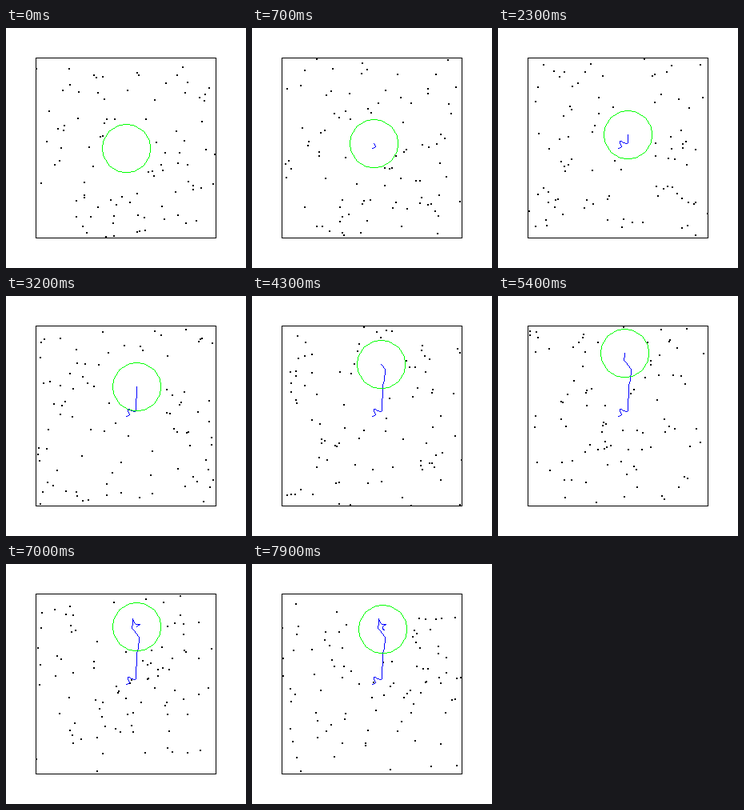
An HTML page with a canvas for the animation above (8000 ms loop, 300 px wide and 300 px high).

```html
<!DOCTYPE html>
<html lang="en">
<head>
<meta charset="utf-8">
<title>Brownian motion</title>
<style>
  html, body { margin: 0; width: 100%; height: 100%; overflow: hidden; background: #fff; }
  canvas { display: block; width: 300px; height: 300px; image-rendering: pixelated; }
</style>
</head>
<body>
<canvas id="stage" width="300" height="300"></canvas>
<script>
const ctx = document.getElementById('stage').getContext('2d');
const STEP_MS = 100, STEPS = 80, COUNT = 90;
const LOW = 38, HIGH = 262, RADIUS = 30, CONTACT = 32;

// The large disc passes one key point every four steps.
const KEY_STEPS = 4;
const route = [
  [150, 150], [154, 148], [152, 143], [153, 141], [157, 143], [162, 143], [162, 130],
  [163, 122], [163, 113], [165, 102], [166, 92], [160, 83], [157, 79], [158, 75],
  [158, 68], [161, 74], [167, 75], [164, 77], [163, 79], [165, 82], [162, 81]
];

// Catmull-Rom interpolation
function spline(a, b, c, d, k) {
  return b + k / 2 * (c - a + k * (2 * a - 5 * b + 4 * c - d + k * (3 * (b - c) + d - a)));
}

function discAt(step) {
  const i = Math.floor(step / KEY_STEPS), k = step / KEY_STEPS - i;
  const key = n => route[Math.min(Math.max(n, 0), route.length - 1)];
  const along = axis => Math.round(
    spline(key(i - 1)[axis], key(i)[axis], key(i + 1)[axis], key(i + 2)[axis], k));
  return { x: along(0), y: along(1) };
}

let seed = 20417;
function random() {
  seed = (seed * 1664525 + 1013904223) % 4294967296;
  return seed / 4294967296;
}

function createParticle() {
  let x, y;
  do {
    x = LOW + random() * (HIGH - LOW);
    y = LOW + random() * (HIGH - LOW);
  } while (Math.hypot(x - 150, y - 150) < CONTACT);
  const angle = random() * Math.PI * 2, speed = 3 + random() * 2;
  return { x, y, vx: Math.cos(angle) * speed, vy: Math.sin(angle) * speed };
}

function bounceWall(p, axis, velocity) {
  if (p[axis] < LOW) {
    p[axis] = 2 * LOW - p[axis];
    p[velocity] = Math.abs(p[velocity]);
  } else if (p[axis] > HIGH) {
    p[axis] = 2 * HIGH - p[axis];
    p[velocity] = -Math.abs(p[velocity]);
  }
}

function bounceDisc(p, disc) {
  const dx = p.x - disc.x, dy = p.y - disc.y, distance = Math.hypot(dx, dy);
  if (distance >= CONTACT) return;
  const nx = dx / distance, ny = dy / distance;
  const inward = p.vx * nx + p.vy * ny;
  if (inward < 0) {
    p.vx -= 2 * inward * nx;
    p.vy -= 2 * inward * ny;
  }
  p.x = disc.x + nx * CONTACT;
  p.y = disc.y + ny * CONTACT;
}

function advance(disc) {
  for (const p of particles) {
    p.x += p.vx;
    p.y += p.vy;
    bounceWall(p, 'x', 'vx');
    bounceWall(p, 'y', 'vy');
    bounceDisc(p, disc);
  }
}

const discs = Array.from({ length: STEPS }, (_, step) => discAt(step));
const particles = Array.from({ length: COUNT }, createParticle);
const snapshots = discs.map((disc, step) => {
  if (step > 0) advance(disc);
  return particles.map(p => ({ x: Math.round(p.x), y: Math.round(p.y) }));
});

// Lines are plotted pixel by pixel to stay free of antialiasing.
function drawLine(a, b) {
  const length = Math.max(Math.abs(b.x - a.x), Math.abs(b.y - a.y), 1);
  for (let i = 0; i <= length; i++) {
    const k = i / length;
    ctx.fillRect(Math.round(a.x + (b.x - a.x) * k), Math.round(a.y + (b.y - a.y) * k), 1, 1);
  }
}

function drawPolyline(points, color) {
  ctx.fillStyle = color;
  for (let i = 1; i < points.length; i++) drawLine(points[i - 1], points[i]);
}

const SIDES = 100;
const circle = Array.from({ length: SIDES + 1 }, (_, i) => {
  const angle = i / SIDES * Math.PI * 2;
  return { x: Math.round(RADIUS * Math.cos(angle)), y: Math.round(RADIUS * Math.sin(angle)) };
});

function draw(step) {
  const disc = discs[step];
  ctx.fillStyle = '#fff';
  ctx.fillRect(0, 0, 300, 300);
  ctx.fillStyle = '#000';
  for (const p of snapshots[step]) ctx.fillRect(p.x - 1, p.y - 1, 2, 2);
  ctx.strokeRect(37.5, 37.5, 225, 225);
  drawPolyline(discs.slice(0, step + 1), '#00f');
  drawPolyline(circle.map(p => ({ x: p.x + disc.x, y: p.y + disc.y })), '#0f0');
}

const start = performance.now();
function tick() {
  draw(Math.floor((performance.now() - start) / STEP_MS) % STEPS);
  requestAnimationFrame(tick);
}
tick();
</script>
</body>
</html>
```
